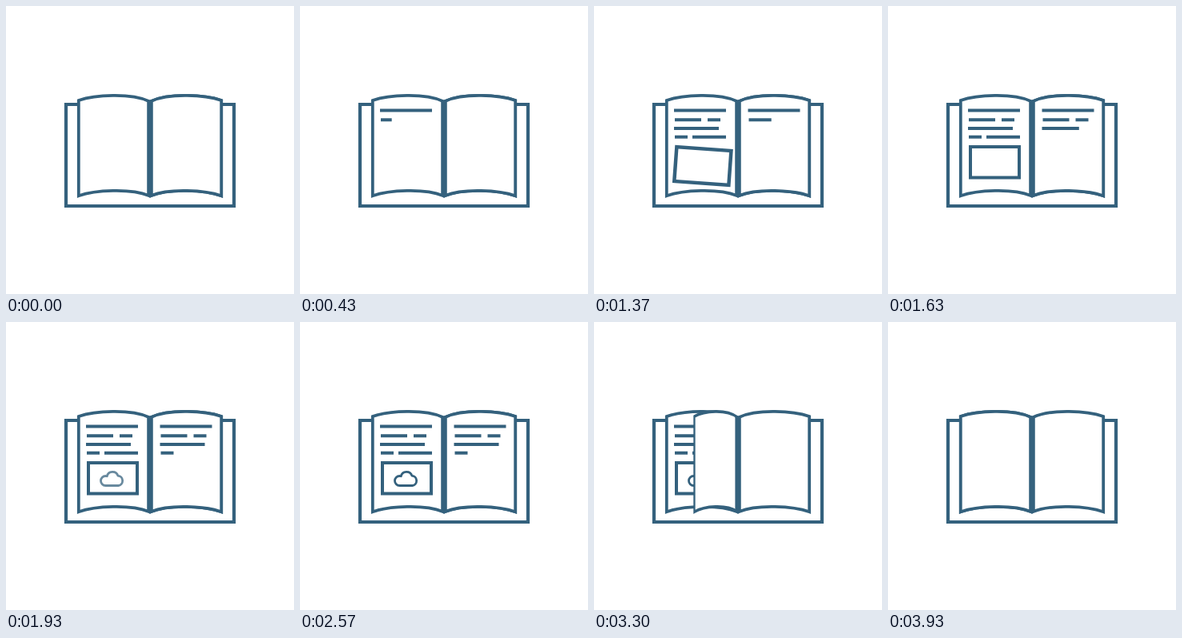
Recreate the animation shown at these times as an HTML page. Size 360 by 360 pixels, loop 4010 ms.

```html
<!DOCTYPE html>
<html lang="en">
<head>
<meta charset="utf-8">
<title>Book</title>
<style>
  html, body { margin: 0; width: 100%; height: 100%; overflow: hidden; background: #fff; }
  svg { display: block; width: 100vw; height: 100vh; }
  svg * { stroke: #34617d; stroke-width: 4; fill: none; }
  #cover { stroke-width: 4.2; }
  .page { fill: #fff; stroke-width: 3.8; }
  #cloud { stroke-width: 2.8; stroke-linejoin: round; }
</style>
</head>
<body>
<svg viewBox="0 0 360 360">
  <defs>
    <path id="sheet" class="page" d="M181.5 119C204 108.5 249 111 269.2 118V237.2C249 230 204 227.5 181.5 237Z"/>
  </defs>
  <path id="cover" d="M90 123H75V250H285V123H270"/>
  <use href="#sheet" transform="matrix(-1 0 0 1 360 0)"/>
  <use href="#sheet"/>
  <g id="left"></g>
  <rect id="photo" x="103" y="176" width="61" height="38.5"/>
  <path id="cloud" d="M124.5 204.5a6 6 0 0 1 0-12q1 0 1.8.3a7 6.7 0 0 1 13.6-.6a6.2 6.2 0 0 1 .6 12.3z"/>
  <g id="turn">
    <use href="#sheet"/>
    <g id="right"></g>
  </g>
  <path d="M178.4 119V237M181.6 119V237"/>
</svg>
<script>
const LOOP = 4010, SPEED = 0.258;
const TYPE_START = 126, PHOTO = [1040, 1560], CLOUD = [1730, 2000], TURN = [2620, 3580];
// x, y and length of each dash, in writing order
const dashes = [
  [100, 130.5, 65], [101, 142.3, 33], [142, 142.3, 16],
  [100, 153, 56], [101, 163.7, 16], [123, 163.7, 42]
];
const $ = id => document.getElementById(id);
const part = (t, [a, b]) => Math.min(1, Math.max(0, (t - a) / (b - a)));

let total = 0;
const lines = [];
function addLine(group, x, y, length) {
  const el = document.createElementNS('http://www.w3.org/2000/svg', 'line');
  for (const [k, v] of Object.entries({ x1: x, x2: x, y1: y, y2: y })) el.setAttribute(k, v);
  group.append(el);
  lines.push({ el, x, length, from: total });
  total += length;
}
dashes.forEach(([x, y, n]) => addLine($('left'), x, y, n));
dashes.slice(0, 5).forEach(([x, y, n]) => addLine($('right'), x + 92.5, y, n));

function draw(t) {
  const typed = (t - TYPE_START) * SPEED;
  for (const { el, x, length, from } of lines) {
    el.setAttribute('x2', x + Math.min(length, Math.max(0, typed - from)));
  }

  const p = part(t, PHOTO), rest = (1 - p) ** 2;
  $('photo').setAttribute('opacity', Math.min(1, p * 4));
  $('photo').setAttribute('transform',
    `translate(${133.5 + 18 * rest} ${195.3 + 36 * rest}) rotate(${31 * rest}) ` +
    `scale(${1 + 0.9 * rest}) translate(-133.5 -195.3)`);

  $('cloud').setAttribute('opacity', part(t, CLOUD));

  const turn = part(t, TURN), sx = Math.cos(Math.PI * turn);
  $('turn').setAttribute('transform', `matrix(${sx} 0 0 1 ${180 * (1 - sx)} 0)`);
  $('right').setAttribute('opacity', 1 - Math.min(1, turn / 0.38));
}

const start = performance.now();
function tick() {
  draw((performance.now() - start) % LOOP);
  requestAnimationFrame(tick);
}
tick();
</script>
</body>
</html>
```
